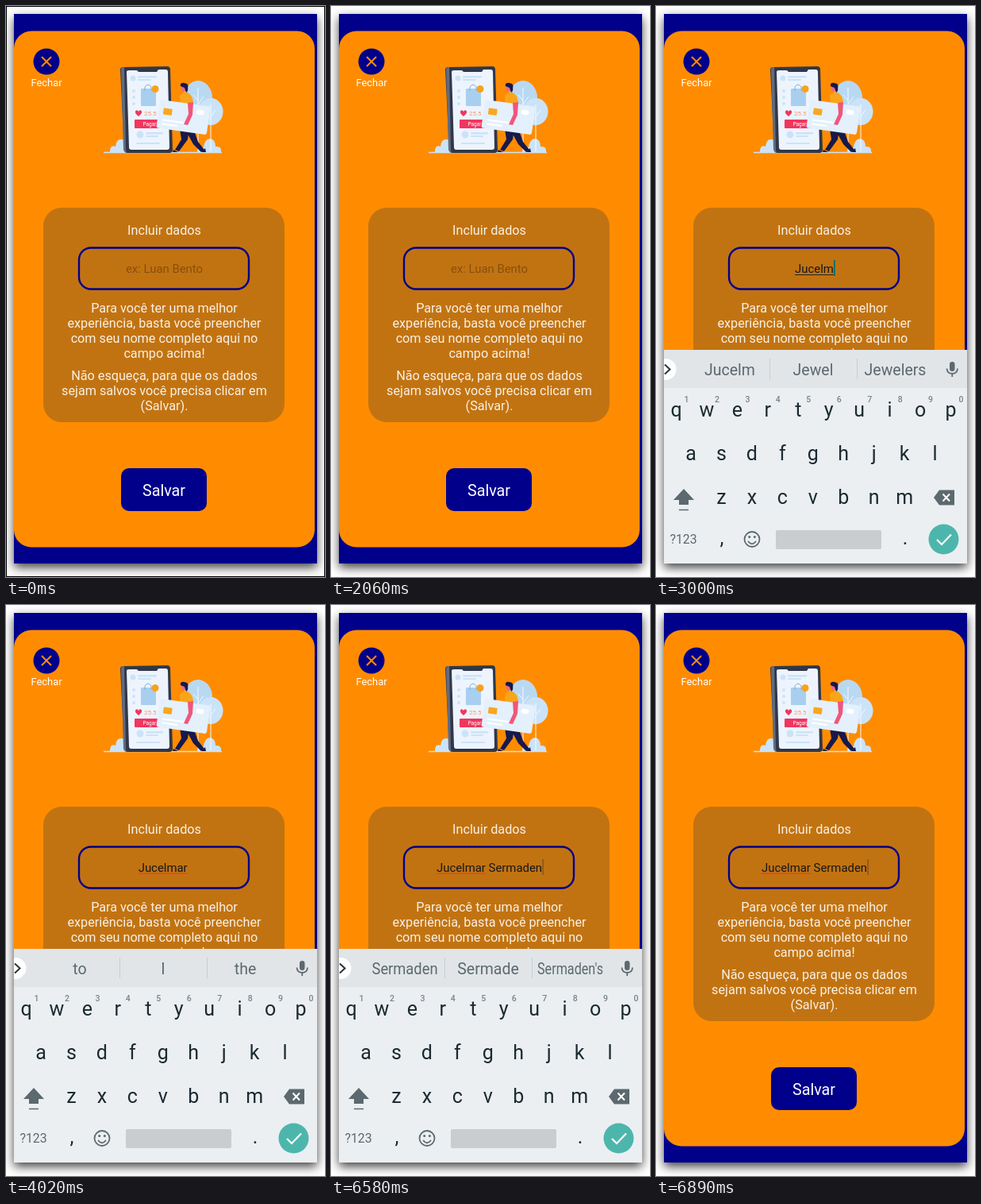
Animation, 402 px wide and 719 px high, one loop 8 s. Source, as an HTML page with a canvas:

```html
<!DOCTYPE html>
<html lang="pt">
<head>
<meta charset="utf-8">
<title>Incluir dados</title>
<style>
html, body { margin: 0; width: 100%; height: 100%; overflow: hidden; background: #fff; }
canvas { display: block; }
</style>
</head>
<body>
<canvas id="stage" width="402" height="719"></canvas>
<script>
const W = 402, H = 719, LOOP = 8000;
const NAVY = '#00008b', ORANGE = '#ff8c00', PALE = '#cbe3f8', INK = '#1b2a30', GREY = '#5c696f';
const FIRST = 'Jucelmar', LAST = 'Sermaden';

const stage = document.getElementById('stage').getContext('2d');
const layer = () => Object.assign(document.createElement('canvas'), { width: W, height: H }).getContext('2d');
const scene = layer(), keys = layer();
let c = scene;

// time, text in the field, three suggestions
const typing = [
  [0, '', ''],
  [2130, 'J', 'Ju Just J'],
  [2290, 'Ju', 'Ju Just July'],
  [2440, 'Juc', 'Juc Just Juice'],
  [2590, 'Juce', 'Juce Juice Judgement'],
  [2760, 'Jucel', 'Jucel Juice Judgement'],
  [2910, 'Jucelm', 'Jucelm Jewel Jewelers'],
  [3070, 'Jucelma', 'Jucelma Jewel Jewellery'],
  [3390, FIRST, 'Jucelmar Jewel Jewellery'],
  [3560, FIRST, 'Jucelmar Jugular Jewellery'],
  [4020, FIRST + ' ', 'to I the'],
  [4170, FIRST + ' S', 'S So See'],
  [4320, FIRST + ' Se', 'Se See Seriously'],
  [4400, FIRST + ' Ser', 'Ser Series Seriously'],
  [4550, FIRST + ' Serm', 'Serm Sermon Sermons'],
  [4630, FIRST + ' Serma', 'Serma Sermon Germany'],
  [4800, FIRST + ' Sermad', 'Sermad Sermon Sermons'],
  [4870, FIRST + ' Sermade', "Sermade Sermaden Sermaden's"],
  [5040, FIRST + ' ' + LAST, "Sermaden Sermade Sermaden's"]
];
// time, opacity, downward shift
const fade = [
  [0, 0, 0], [2130, .55, 9], [2210, .93, 2], [2290, 1, 0],
  [6660, .95, 3], [6740, .8, 11], [6810, .35, 24], [6890, 0, 0]
];
const caret = [[0, 0], [1050, 1], [1510, 0], [2130, 1], [4020, 0], [4100, 1], [5570, 0], [6050, 1], [6580, .35]];
const at = (table, t) => table.filter(row => row[0] <= t).pop();

function fill(color, path) { c.fillStyle = color; c.fill(path); }
function box(x, y, w, h, r, color) {
  c.beginPath();
  c.roundRect(x, y, w, h, r);
  c.fillStyle = color;
  c.fill();
}
function disc(x, y, r, color) {
  c.beginPath();
  c.arc(x, y, r, 0, 7);
  c.fillStyle = color;
  c.fill();
}
function shape(d, color) { fill(color, new Path2D(d)); }
function line(d, color, width = 2) {
  c.strokeStyle = color;
  c.lineWidth = width;
  c.stroke(new Path2D(d));
}
function text(s, x, y, size, color, { align = 'center', weight = 400, max } = {}) {
  c.font = `${weight} ${size}px Roboto, sans-serif`;
  c.textAlign = align;
  c.fillStyle = color;
  max ? c.fillText(s, x, y, max) : c.fillText(s, x, y);
}

function drawArt() {
  line('M123 184.5H272', PALE, 1.5);
  shape('M131 184Q131 174 138 177Q139 167 146 168Q153 168 153 177Q160 176 159 184Z', PALE);
  shape('M241 184Q243 176 249 178Q250 168 257 167Q264 168 264 177Q272 176 271 184Z', PALE);

  // trees
  c.beginPath();
  c.ellipse(242, 116, 18, 22, 0, 0, 7);
  c.fillStyle = '#b9d9f3';
  c.fill();
  c.beginPath();
  c.ellipse(258, 133, 15.5, 17, 0, 0, 7);
  c.fillStyle = PALE;
  c.fill();
  line('M242 103V183M242 124L249 114M242 119L236 112M258 124V183M258 139L264 131M258 143L252 136', '#f4f9ff', 1);

  // phone
  shape('M144 80Q144 77 148 77L203 76Q207 76 207 80L210 181Q210 185 206 185L153 185Q149 185 149 181Z', '#30374a');
  shape('M145 80Q145 77 149 77L151 181Q151 185 154 185Q149 185 148 181Z', '#626b7e');
  shape('M152 83Q152 81 155 81L165 81L167 83L190 83L192 80L201 80Q204 80 204 83L206 178Q206 181 203 181L158 181Q155 181 155 178Z', '#edf4fd');
  disc(160, 91, 3.5, PALE);
  box(166, 88, 24, 2.5, 1, PALE);
  box(166, 92, 17, 2, 1, PALE);
  box(170, 104, 19, 22, 1, '#a9cff0');
  line('M175 107V102Q179 96 183 102V107', '#7fb1dc', 1);
  disc(188, 104.5, 4.5, '#f7a21b');
  for (const y of [107, 115, 123]) disc(161, y, 2, PALE);
  shape('M167 139Q162 135 163 132.500Q165.500 130 167 133Q168.500 130 171 132.500Q172 135 167 139Z', '#f0365f');
  text('25.5', 174, 138, 8, '#f59a72', { align: 'left' });
  box(162, 143, 36, 11, 1, '#f0365f');
  text('Pagar', 181, 151, 6.5, '#fff');
  disc(169, 162, 4.5, PALE);
  box(176, 159, 22, 2.5, 1, PALE);
  box(176, 163, 16, 2, 1, PALE);
  box(164, 172, 30, 2, 1, PALE);

  // walker with the card
  shape('M219 155L231 154L229 168L218 183L213 181L221 168Z', '#17194c');
  shape('M225 154L236 154L242 171L250 181L246 184L236 174Z', '#17194c');
  shape('M211 181L217 184H210ZM246 184L251 179L252 184Z', '#17194c');
  shape('M219 113Q222 108 229 109Q235 112 236 121L234 130L220 130Z', '#f9a51a');
  disc(225, 103, 4.5, '#f46a85');
  shape('M220 101Q219 96 225 97Q231 98 229 103Q230 107 227 109L225 103Z', '#17194c');
  c.save();
  c.translate(223.5, 140);
  c.rotate(.14);
  box(-32, -18, 64, 36, 3, '#e4f0fc');
  box(-26, -8, 11, 8, 1, '#f8a71f');
  box(-26, 6, 30, 2, 1, '#fff');
  box(-26, 11, 20, 2, 1, '#fff');
  box(15, -12, 10, 6, 3, '#fff');
  c.restore();
  shape('M229 122L236 121L235 137L229 150L224 149L230 136Z', '#f0567b');
}

function drawScene() {
  c = scene;
  c.fillStyle = '#fff';
  c.fillRect(0, 0, W, H);
  c.save();
  c.shadowColor = 'rgba(0,0,0,.75)';
  c.shadowBlur = 12;
  c.shadowOffsetY = 5;
  box(10, 10, 382, 692, 0, NAVY);
  c.restore();
  box(10, 31.5, 379, 650, 22, ORANGE);

  disc(51, 70, 16.5, NAVY);
  line('M45 64L57 76M57 64L45 76', ORANGE);
  text('Fechar', 51, 100.5, 12.9, '#fff');
  drawArt();

  box(47, 254, 304, 270, 23, '#c27311');
  text('Incluir dados', 199.5, 288, 16.2, '#f8f1e6');
  c.beginPath();
  c.roundRect(92, 304.5, 214, 52, 15);
  c.strokeStyle = NAVY;
  c.lineWidth = 2.4;
  c.stroke();
  const help = ['Para você ter uma melhor', 'experiência, basta você preencher',
    'com seu nome completo aqui no', 'campo acima!', 'Não esqueça, para que os dados',
    'sejam salvos você precisa clicar em', '(Salvar).'];
  help.forEach((s, i) => text(s, 199.5, 386 + i * 19 + (i > 3 ? 9 : 0), 16.2, '#f8f1e6'));

  box(145, 582, 108, 54, 10, NAVY);
  text('Salvar', 199, 617, 19.7, '#fff');
}

function drawKeys(words) {
  c = keys;
  box(10, 433, 382, 269, 0, '#ebeff2');
  box(10, 433, 382, 48, 0, '#e1e5e8');
  disc(12, 457.5, 13.5, '#fff');
  line('M11 451.500L17.500 457.500L11 463.500', '#2b3438');
  line('M143.500 444V470M253.500 444V470', '#c8cdd0', 1);
  words.split(' ').forEach((s, i) => text(s, [93, 198, 301.5][i], 465, 19.5, GREY, { max: 83 }));
  box(370, 448, 6.5, 12, 3.2, GREY);
  line('M366.500 456.500Q367 463 373.250 463Q379.500 463 380 456.500M373.250 463V467', GREY, 1.8);

  const pitch = 38.45;
  [['qwertyuiop', 25.5, 517], ['asdfghjkl', 44, 572], ['zxcvbnm', 82.5, 627]].forEach(([row, x, y]) =>
    [...row].forEach((ch, i) => text(ch, x + i * pitch, y, 25, INK)));
  for (let i = 0; i < 10; i++) text((i + 1) % 10, 38.5 + i * pitch, 499, 10.5, '#77848a', { weight: 500 });

  shape('M35 608L48 622H41V628H29V622H22Z', GREY);
  line('M29 634.500H41', GREY, 1.5);
  shape('M350 619L357 609.500H376V628.500H357Z', GREY);
  line('M361.500 614.500L370 623.500M370 614.500L361.500 623.500', '#fff');

  text('?123', 34.5, 677, 15.8, GREY);
  text(',', 83, 678, 25, INK);
  text('.', 314, 678, 25, INK);
  line('M111.500 671.500a9.500 9.500 0 1 0 19 0a9.500 9.500 0 1 0 -19 0M116 674Q121 680.500 126 674', GREY, 1.8);
  disc(117.7, 668.5, 1.5, GREY);
  disc(124.3, 668.5, 1.5, GREY);
  box(151, 660, 133, 24, 2, '#c9cdd0');
  disc(362.5, 671.5, 19, '#4db6ac');
  line('M354 672L360 678L372 665.500', '#fff', 2.2);
}

function drawField(t, value) {
  const mid = 199.5, size = 14.9;
  if (!value) text('ex: Luan Bento', mid, 336, size, '#85500f');
  c.font = `${size}px Roboto, sans-serif`;
  const width = s => c.measureText(s).width;
  const left = mid - width(value) / 2;
  if (value) {
    text(value, left, 336, size, '#15181a', { align: 'left' });
    const gap = value.indexOf(' ');
    const start = gap < 0 ? 0 : width(value.slice(0, gap + 1));
    if (gap > 0) box(left, 337.5, width(FIRST), 1.3, 0, '#e2412f');
    if (t < 6580) box(left + start, 338, width(value) - start, 1, 0, '#222');
  }
  const on = at(caret, t)[1];
  c.globalAlpha = on;
  box(left + width(value), 320, 2, 20, 0, on < 1 ? '#333' : '#12706c');
  c.globalAlpha = 1;
}

function frame(now) {
  const t = now % LOOP;
  const [, value, words] = at(typing, t);
  const [, alpha, shift] = at(fade, t);
  c = stage;
  c.drawImage(scene.canvas, 0, 0);
  drawField(t, value);
  if (alpha) {
    drawKeys(words);
    const h = 269 - shift;
    stage.globalAlpha = alpha;
    stage.drawImage(keys.canvas, 10, 433, 382, h, 10, 433 + shift, 382, h);
    stage.globalAlpha = 1;
  }
  if (t < 500) {
    stage.lineWidth = 1;
    stage.strokeStyle = '#000';
    stage.strokeRect(.5, .5, W - 1, H - 1);
  }
  requestAnimationFrame(frame);
}

drawScene();
requestAnimationFrame(frame);
</script>
</body>
</html>
```
